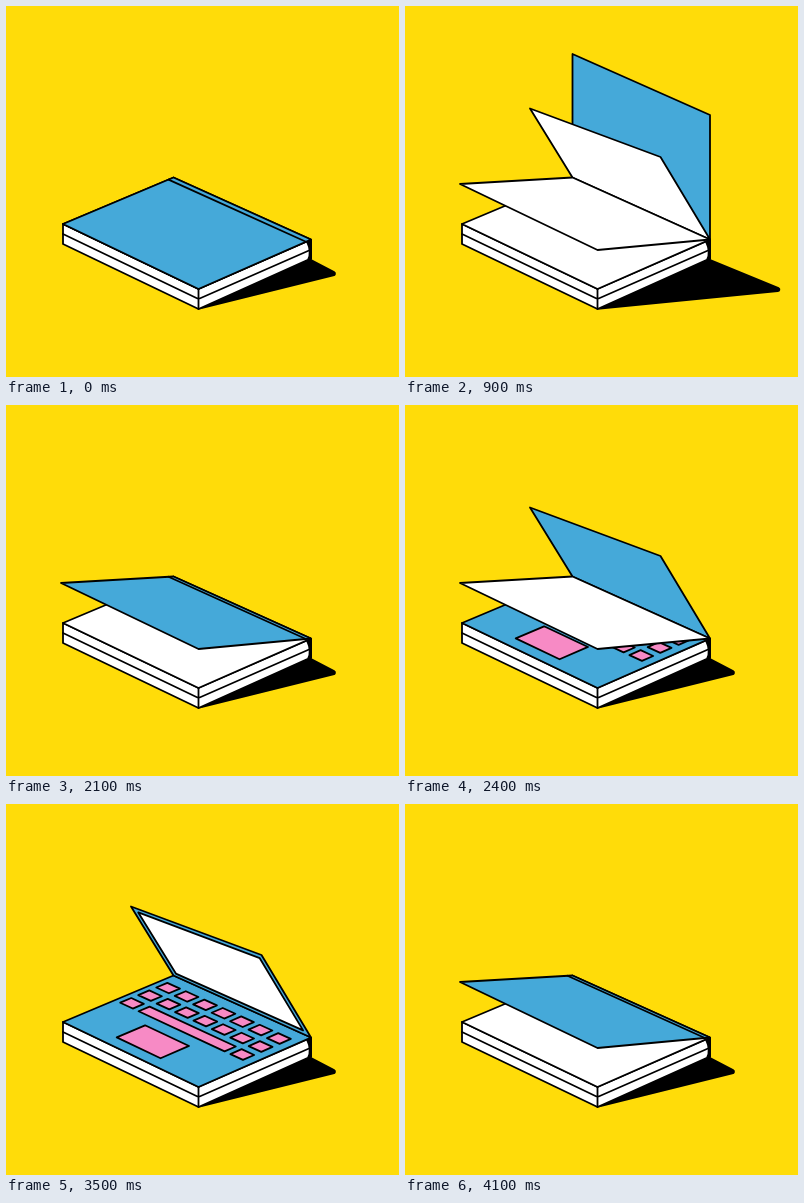
These frames come from a looping animation (393x371 px, 4400 ms). An HTML page:

```html
<!DOCTYPE html>
<html lang="en">
<head>
<meta charset="utf-8">
<title>Book and laptop</title>
<style>
  html, body { margin: 0; width: 100%; height: 100%; overflow: hidden; background: #ffdc09; }
  svg { display: block; width: 100vw; height: 100vh; }
  .line { stroke: #000; stroke-width: 1.8; stroke-linejoin: round; stroke-linecap: round; }
</style>
</head>
<body>
<svg id="stage" viewBox="0 0 393 371"></svg>
<script>
const BLUE = '#45a9d9', PINK = '#f78ac5', WHITE = '#fff';
const stage = document.getElementById('stage');

// Every leaf hangs on the same spine; its arms lead from the spine ends to the free corners
const BACK = [167.5, 171.5], FRONT = [305, 233.5];
const ARMS = {
  flat: [[-110.5, 46.5], [-112.5, 49.5]],
  low:  [[-112.5, 6.5], [-112.5, 10.5]],
  mid:  [[-42.5, -69], [-49.5, -82.5]],
  up:   [[0, -123.5], [0, -124.5]]
};

const mix = (a, b, k) => a + (b - a) * k;

// Point on a leaf: u runs along the spine, v out to the free edge
const at = (leaf, u, v) => [0, 1].map(i =>
  mix(BACK[i] + v * ARMS[leaf][0][i], FRONT[i] + v * ARMS[leaf][1][i], u));

const path = (d, fill = 'none') => `<path class="line" d="${d}" fill="${fill}"/>`;

function panel(leaf, fill, u0 = 0, u1 = 1, v0 = 0, v1 = 1) {
  const corners = [[u0, v0], [u1, v0], [u1, v1], [u0, v1]];
  return path(`M${corners.map(c => at(leaf, ...c)).join(' ')}Z`, fill);
}

function shadow(x, y) {
  const r = 2.6;
  return `<path d="M192.5 303.8L${x} ${y + r}A${r} ${r} 0 0 0 ${x + r * .4} ${y - r * .9}L305 253L290 250Z"/>`;
}

function keyboard() {
  const key = (row, from, to = from) => {
    const u = col => .0855 + .1346 * col, v = .155 + .163 * row;
    return panel('flat', PINK, u(from) - .046, u(to) + .046, v - .05, v + .05);
  };
  let keys = key(2, 0) + key(2, 1, 5) + key(2, 6);
  for (let col = 0; col < 7; col++) keys += key(0, col) + key(1, col);
  return keys + panel('flat', PINK, .312, .635, .642, .897);
}

function base(laptop) {
  const [left, front] = [at('flat', 0, 1), at('flat', 1, 1)];
  const drop = ([x, y], h) => [x, y + h];
  const edge = '301 235.5Q306 246 302 253.8';
  return path(`M${left}L${front}L${edge}L${drop(front, 20)}L${drop(left, 20)}Z`, WHITE) +
    path(`M${drop(left, 10)}L${drop(front, 10)}L303 244.5M${front}v20`) +
    `<path d="M${edge}H306V233Z"/>` +
    panel('flat', laptop ? BLUE : WHITE) + (laptop ? keyboard() : '');
}

function draw(cover, { pages = [], laptop = false, screen = false } = {}) {
  let out = cover === 'up' ? shadow(372.8, 283.5) : shadow(327.4, 267.6);
  out += base(laptop) + panel(cover, BLUE);
  if (cover === 'flat' || cover === 'low')
    out += path(`M${at(cover, 0, .045)}L${at(cover, 1, .045)}`);
  if (screen) {
    const rim = cover === 'up' ? .047 : .036;
    out += panel(cover, WHITE, rim, 1 - rim, .06, .94);
  }
  return out + pages.map(page => panel(page, WHITE)).join('');
}

const closed = draw('flat');
const ajar = draw('low');
const half = draw('mid', { pages: ['low'] });
const open = draw('up', { pages: ['mid', 'low'] });
const reveal = draw('mid', { pages: ['low'], laptop: true });
const tilted = draw('mid', { laptop: true, screen: true });
const computer = draw('up', { laptop: true, screen: true });

// Each run opens to its last pose, then closes the same way back
const swing = run => [...run, ...run.slice(1, -1).reverse()];
const poses = [
  ...swing([closed, ajar, half, open]),
  ...swing([closed, ajar, reveal, tilted, computer])
];
// The second swing starts from the closed book that ends the first
const STEP = 300, HOLD = 200, LOOP = poses.length * STEP + HOLD;
const holdEnd = (poses.indexOf(computer) + 1) * STEP;

let shown = null;
function update(time) {
  let t = time % LOOP;
  // The open computer stays a little longer than the other poses
  if (t >= holdEnd) t = Math.max(holdEnd - 1, t - HOLD);
  const pose = poses[Math.floor(t / STEP)];
  if (pose !== shown) stage.innerHTML = shown = pose;
}

const start = performance.now();
function tick() {
  update(performance.now() - start);
  requestAnimationFrame(tick);
}
tick();
</script>
</body>
</html>
```
